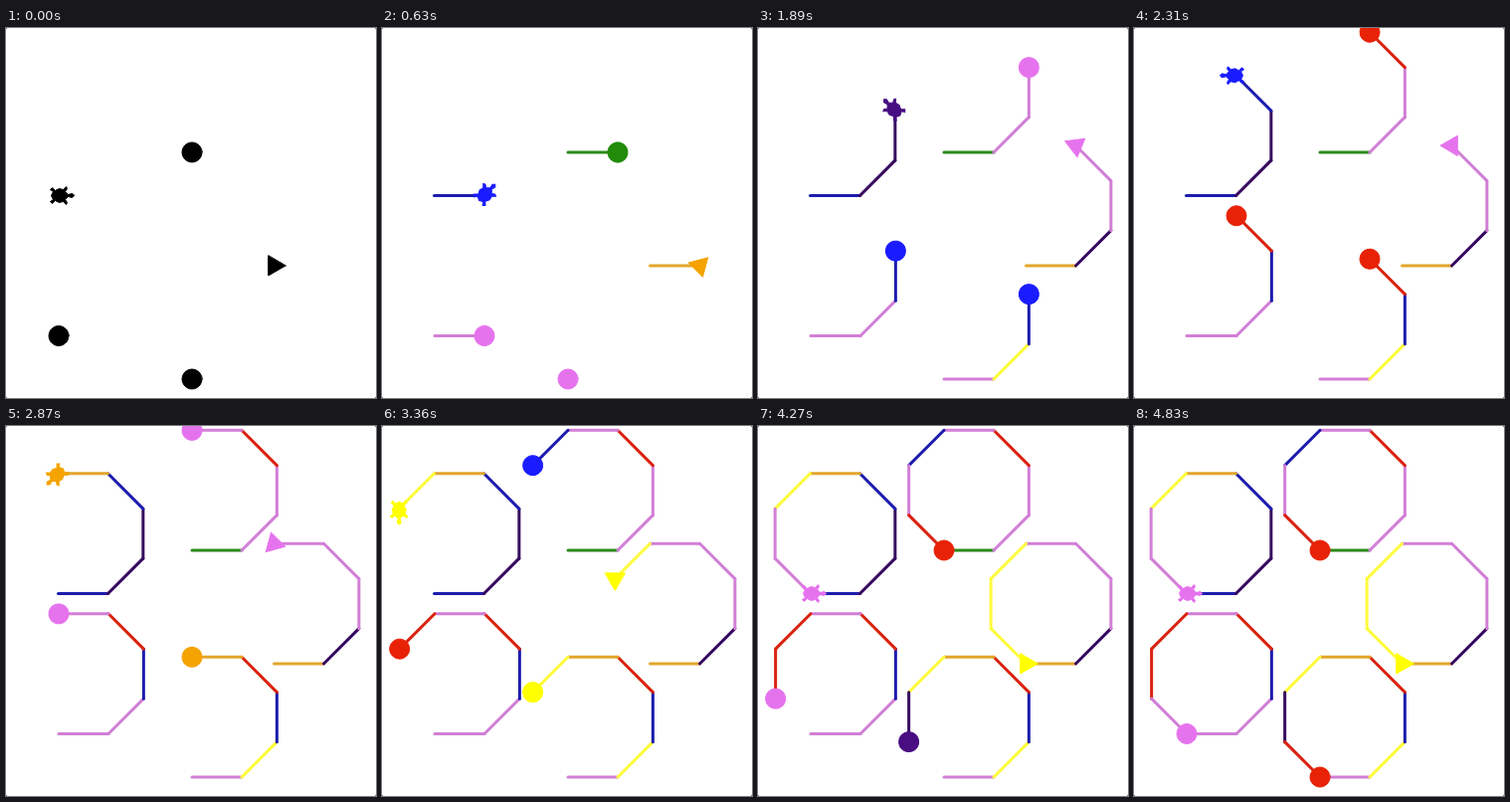
An HTML page with a canvas that plays this animation: 372x372 px, repeating every 4.9 s.

```html
<!DOCTYPE html>
<html lang="en">
<head>
<meta charset="utf-8">
<title>Turtle octagons</title>
<style>
  html, body { margin: 0; width: 100%; height: 100%; overflow: hidden; background: #fff; }
  canvas { display: block; width: 100vw; height: 100vh; }
</style>
</head>
<body>
<canvas id="stage" width="372" height="372"></canvas>
<script>
const SIZE = 372, STEP = 70, LOOP = 4900, SIDE = 50;
const ctx = document.getElementById('stage').getContext('2d');

// [shape colour, thin line colour]
const colors = {
  r: ['#e82206', '#d9220e'],
  o: ['#f4a300', '#e2a62c'],
  y: ['#ffff00', '#fdfb3c'],
  g: ['#228b0a', '#2b8a1a'],
  b: ['#1a1cff', '#1c1cae'],
  i: ['#480e82', '#36085f'],
  v: ['#e673ee', '#d27fd6']
};

// Outlines face right; the turtle is one half, mirrored.
const half = [[16, 0], [14, 2], [10, 1], [7, 4], [9, 7], [8, 9], [5, 6], [1, 7],
              [-3, 5], [-6, 8], [-8, 6], [-5, 4], [-7, 0]];
const shapes = {
  turtle: half.concat(half.slice(1, -1).reverse().map(([x, y]) => [x, -y])),
  triangle: [[11.55, 0], [-5.77, 10], [-5.77, -10]],
  circle: Array.from({ length: 20 }, (_, k) =>
    [10 * Math.cos(k * Math.PI / 10), 10 * Math.sin(k * Math.PI / 10)])
};

// In the order in which they take turns; one letter per side.
const turtles = [
  { shape: 'triangle', x: 269.5, y: 239, sides: 'oivvvyyy' },
  { shape: 'turtle', x: 52.5, y: 168.5, sides: 'biiboyvv' },
  { shape: 'circle', x: 187, y: 125, sides: 'gvvrvbvr' },
  { shape: 'circle', x: 53, y: 309.5, sides: 'vvbrvrrv' },
  { shape: 'circle', x: 187, y: 353, sides: 'vybroyir' }
];

// Pace of the program: [tick, moves done]
const pace = [[0, 0], [8, 4.02], [9, 4.1], [20, 11.05], [33, 19.75], [41, 24.8], [55, 34.25], [64, 40]];

function movesAt(tick) {
  const k = pace.findIndex(p => p[0] > tick);
  if (k < 0) return 40;
  const [t0, m0] = pace[k - 1], [t1, m1] = pace[k];
  return m0 + (m1 - m0) * (tick - t0) / (t1 - t0);
}

const clamp = v => Math.max(0, Math.min(1, v));
const hops = (v, n) => Math.round(clamp(v) * n) / n;

function tracePath(points) {
  ctx.beginPath();
  points.forEach(([x, y]) => ctx.lineTo(x, y));
}

// One move: set the colour, go forward in 3 hops, turn in 4.
function drawTurtle(turtle, index, moves) {
  let { x, y, shape, sides } = turtle, angle = 0, fill = '#000';
  ctx.lineWidth = 3;
  ctx.lineCap = 'round';
  for (let s = 0; s < sides.length; s++) {
    const v = moves - (s * turtles.length + index);
    if (v <= 0) break;
    const [body, line] = colors[sides[s]];
    const length = SIDE * hops((v - 0.12) / 0.43, 3);
    const from = [x, y];
    fill = body;
    x += length * Math.cos(angle);
    y -= length * Math.sin(angle);
    if (length) {
      ctx.strokeStyle = line;
      tracePath([from, [x, y]]);
      ctx.stroke();
    }
    angle += Math.PI / 4 * hops((v - 0.55) / 0.4, 4);
  }
  return { x, y, angle, shape, fill };
}

function drawShape({ x, y, angle, shape, fill }) {
  ctx.save();
  ctx.translate(x, y);
  ctx.rotate(-angle);
  tracePath(shapes[shape]);
  ctx.closePath();
  ctx.lineWidth = 1;
  ctx.fillStyle = ctx.strokeStyle = fill;
  ctx.fill();
  ctx.stroke();
  ctx.restore();
}

function draw(time) {
  const moves = movesAt(Math.floor(time % LOOP / STEP));
  ctx.fillStyle = '#fff';
  ctx.fillRect(0, 0, SIZE, SIZE);
  ctx.fillStyle = '#777';
  for (const cx of [0, SIZE - 1]) for (const cy of [0, SIZE - 1]) ctx.fillRect(cx, cy, 1, 1);
  turtles.map((t, k) => drawTurtle(t, k, moves)).forEach(drawShape);
}

const start = performance.now();
function loop() {
  draw(performance.now() - start);
  requestAnimationFrame(loop);
}
loop();
</script>
</body>
</html>
```
